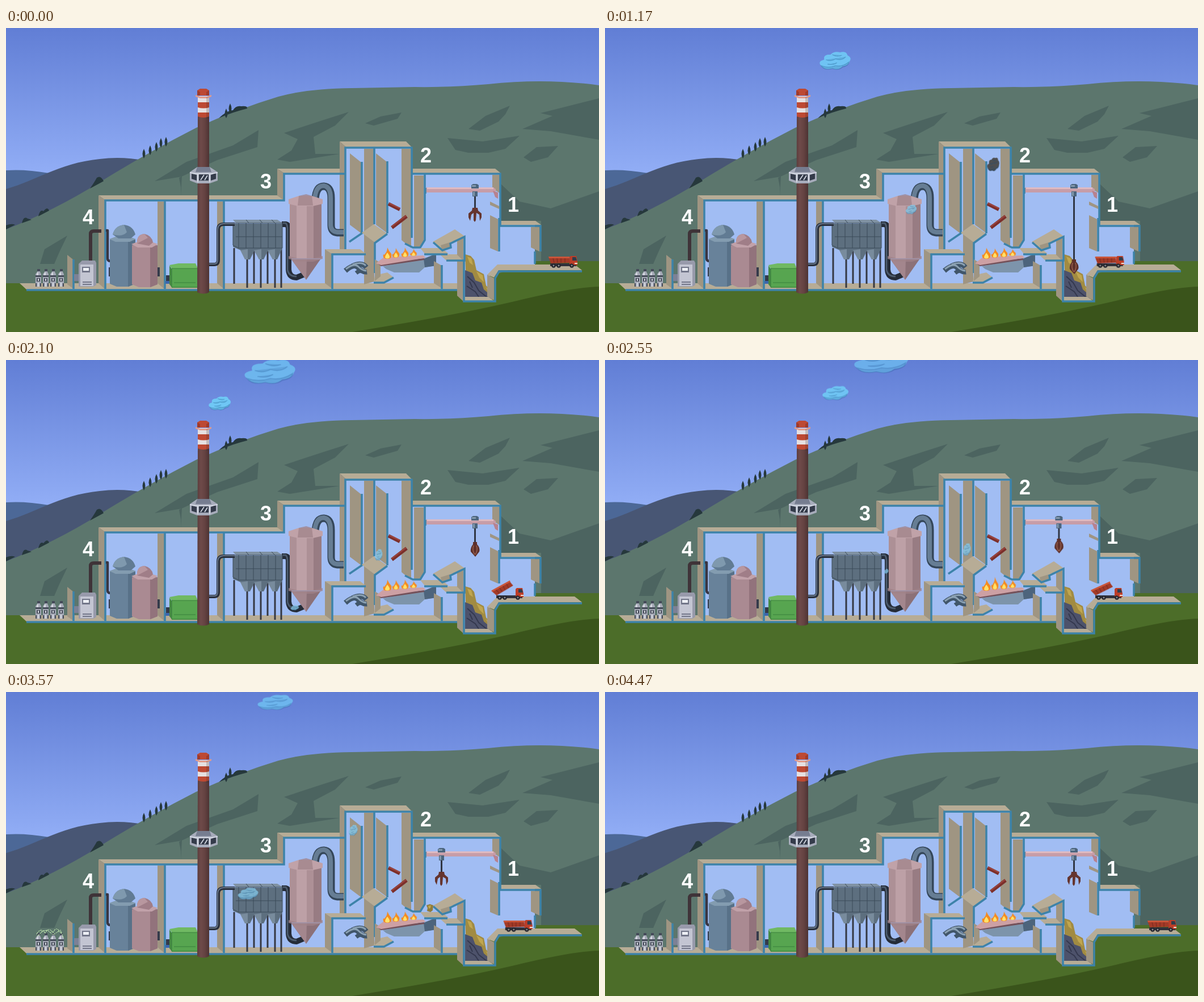
Write an HTML page without scripts that moves like this. It is 1045 by 536 pixels and loops after 4.53 s.

```html
<!DOCTYPE html>
<html lang="en">
<head>
<meta charset="utf-8">
<title>Waste-to-energy plant</title>
<style>
html,body{margin:0;width:100%;height:100%;overflow:hidden;background:#4b6c28}
svg{display:block;width:1045px;height:536px}
text{font:bold 36px "Liberation Sans",Arial,sans-serif;fill:#fff}
.top{fill:#b7ac96}.side{fill:#9f9582}.room{fill:#a1bdf3}
.edge{fill:none;stroke:#3d83a9;stroke-width:3.5}
.patch{fill:#4c6460}.tree{fill:#26383c}
.pipe{fill:none;stroke-linejoin:round}
.seam{fill:none;stroke:#3b4b59;stroke-width:1}
.puff{color:#70c7f5}
.anim{animation:4530ms linear infinite}
.plumeA{animation-name:plumeA}.plumeB{animation-name:plumeB}
.smoke{animation-name:smoke}
.duct{animation-name:duct;color:#83c3e4}
.truck{animation-name:truck}
.bed{animation-name:bed;transform-origin:960px 416px}
.trolley{animation-name:trolley}.hoist{animation-name:hoist}
.open{animation-name:open;animation-timing-function:step-end}
.shut{animation-name:shut;animation-timing-function:step-end}
.chunk{animation-name:chunk}
.spark{fill:none;stroke:#c9f0b4;stroke-width:1.1;stroke-dasharray:4 1.5 2 1;opacity:0;animation-timing-function:step-end}
.s1{animation-name:s1}.s2{animation-name:s2}.s3{animation-name:s3}
.flame{animation:flame 906ms linear infinite}
@keyframes plumeA{
0%,3.5%{transform:translate(350px,109px) scale(.1);opacity:0}
5.3%{transform:translate(355px,96px) scale(.45,.8);opacity:1}
15.9%{transform:translate(377px,77px);opacity:1}
35.76%{transform:translate(435px,40px) scale(1.8,1.6);opacity:.9}
46.36%{transform:translate(466px,22px) scale(2.3,1.75);opacity:.75}
65.56%{transform:translate(508px,-14px) scale(2.6,1.7);opacity:.6}
72%,100%{transform:translate(525px,-35px) scale(2.7,1.7);opacity:0}}
@keyframes plumeB{
0%,34%{transform:translate(350px,109px) scale(.1);opacity:0}
35.76%{transform:translate(355px,96px) scale(.45,.8);opacity:1}
46.36%{transform:translate(377px,77px);opacity:1}
65.56%{transform:translate(434px,42px) scale(1.35,1.05);opacity:.9}
78.8%{transform:translate(475px,19px) scale(1.6,1.1);opacity:.75}
95%,100%{transform:translate(525px,-20px) scale(1.9,1.2);opacity:.6}}
@keyframes smoke{
0%,4%{transform:translate(692px,388px) scale(.15);opacity:0;color:#4b4a4d}
7%{opacity:1}
15.9%{transform:translate(696px,302px) scale(.57,1.45);opacity:1}
28%{transform:translate(682px,228px) scale(.55,.9)}
35.76%{transform:translate(658px,233px) scale(.45,.75);opacity:1;color:#4e5053}
42%{color:#83bfdd}
46.36%{transform:translate(657px,344px) scale(.34,.85);opacity:.85;color:#83c3e4}
51%{transform:translate(646px,364px) scale(.34,.6)}
55%{transform:translate(638px,345px) scale(.36,.9)}
65.56%{transform:translate(635px,262px) scale(.4,1.05);opacity:.85}
72%{transform:translate(624px,224px) scale(.4,.8)}
78.8%{transform:translate(612px,244px) scale(.4,.8);opacity:.85}
91%{transform:translate(603px,345px) scale(.35,.8);opacity:.8;color:#83c3e4}
94%,100%{transform:translate(592px,358px) scale(.2);opacity:0;color:#83c3e4}}
@keyframes duct{
0%,4%{transform:translate(592px,359px) scale(.2);opacity:0}
6%{transform:translate(575px,355px) scale(.25,.4);opacity:.8}
11%{transform:translate(572px,300px) scale(.25,.5)}
15.9%{transform:translate(562px,281px) scale(.55,.42);opacity:.8}
22%{transform:translate(545px,296px) scale(.35,.5)}
35.76%{transform:translate(526px,383px) scale(.87,1.2);opacity:.8}
46.36%{transform:translate(509px,437px) scale(.38,.38);opacity:.8}
51%{transform:translate(497px,410px) scale(.18,.5)}
60%{transform:translate(495px,347px) scale(.2,.25)}
65.56%{transform:translate(476px,345px) scale(.52,.24);opacity:.8}
78.8%{transform:translate(427px,356px) scale(.92,.85);opacity:.8}
91%{transform:translate(400px,346px) scale(.25,.2);opacity:.8}
95%,100%{transform:translate(376px,350px) scale(.12);opacity:0}}
@keyframes truck{
0%,9.4%{transform:none;animation-timing-function:ease}
30.3%,75.9%{transform:translateX(-95px);animation-timing-function:ease}
96.8%,100%{transform:none}}
@keyframes bed{0%,37%{transform:none}46%,55%{transform:rotate(-29deg)}64%,100%{transform:none}}
@keyframes trolley{0%,50%{transform:none}64%,83%{transform:translateX(-59px)}97%,100%{transform:none}}
@keyframes hoist{0%,2%{transform:none}15.5%,29%{transform:translateY(93px)}
35.76%{transform:translateY(60px)}46.36%{transform:translateY(6px)}48%,100%{transform:none}}
@keyframes open{0%{opacity:1}23%{opacity:0}70.5%,100%{opacity:1}}
@keyframes shut{0%{opacity:0}23%{opacity:1}70.5%,100%{opacity:0}}
@keyframes chunk{0%,70%{transform:translate(767px,333px);opacity:0}71%{opacity:1}
75%{transform:translate(767px,370px)}78.8%{transform:translate(747px,381px);opacity:1}
88%{transform:translate(715px,396px);opacity:1}91%,100%{transform:translate(705px,402px);opacity:0}}
@keyframes s1{0%{opacity:0}30%{opacity:1}38%,100%{opacity:0}}
@keyframes s2{0%{opacity:0}62%{opacity:1}70%,100%{opacity:0}}
@keyframes s3{0%{opacity:0}70%{opacity:1}83%,100%{opacity:0}}
@keyframes flame{0%,36%,92%,100%{transform:none}18%{transform:scaleY(.92)}79%{transform:scaleY(var(--peak))}}
</style>
</head>
<body>
<svg viewBox="0 0 1045 536">
<defs>
<linearGradient id="sky" x2="0" y2="1"><stop stop-color="#617ed5"/><stop offset=".68" stop-color="#92aef6"/></linearGradient>
<linearGradient id="brick"><stop stop-color="#5b3c3c"/><stop offset=".3" stop-color="#6e4a49"/><stop offset=".65" stop-color="#644241"/><stop offset="1" stop-color="#4d3333"/></linearGradient>
<clipPath id="below"><path d="M700 296H900V500H700Z"/></clipPath>
<g id="cloud">
<path fill="currentColor" d="M-19 5Q-22 0-14-2Q-16-9-6-9Q-2-14 6-12Q14-14 15-8Q21-5 18 0Q17 6 9 7Q4 13-4 10Q-14 13-19 5Z"/>
<path d="M-18 6Q-9 10 0 6Q9 8 17 1Q17 6 9 8Q4 13-4 10Q-14 13-18 6ZM-12-2Q-6 1 0-3Q8 0 13-6M-4-9Q2-5 8-8M-10 4Q-3 6 2 2" fill="#134a7a" fill-opacity=".18" stroke="#1b5b8d" stroke-opacity=".3" stroke-width="1"/>
</g>
<g id="fire">
<path fill="#f58a1f" d="M0-20Q3-13 7-9Q9 0 0 0Q-9 0-7-8Q-5-6-4-9Q0-13 0-20Z"/>
<path fill="#ffe26a" d="M0-11Q5-5 4-2Q0 1-4-2Q-4-6 0-11Z"/>
</g>
<g id="bottle">
<path fill="#a5a9b6" d="M3 0H8V5L10 9V31H0V9L3 5Z"/>
<path fill="#444a58" d="M3 0H8V4H3ZM0 11H10V14H0ZM2 16H8V22H2ZM0 25H2V31H0ZM8 25H10V31H8Z"/>
<path fill="#d5d8e0" d="M3 6H5V11H2V9ZM4 17H6V21H4ZM4 24H6V31H4Z"/>
</g>
<path id="cypress" class="tree" d="M0 0Q-5-7 0-17Q5-7 0 0Z"/>
</defs>

<path fill="url(#sky)" d="M0 0H1045V380H0Z"/>
<path fill="#4c6897" d="M0 251Q45 248 100 261V350H0Z"/>
<path fill="#485674" d="M0 284C55 268 95 238 165 231Q205 226 245 234V380H0Z"/>
<path fill="#5c766d" d="M0 355Q85 322 165 272T335 176Q410 142 480 121Q530 107 610 106L720 104Q780 105 850 99Q950 88 1045 101V460H0Z"/>
<g class="patch">
<path d="M262 270L318 236L400 207L445 180L443 210L372 233L305 264L308 280V296L310 262Z"/>
<path d="M604 148L560 162L490 185L514 196L503 216L478 232L500 236L588 222L545 222L542 192L580 172Z"/>
<path d="M633 168L660 156L697 149L690 160L648 172ZM815 178L845 155L888 137L880 152L868 165L835 181Z"/>
<path d="M910 178L963 155L942 150L1045 124V197L960 182ZM912 228L935 210L973 208L955 228L925 236Z"/>
<path d="M778 194L840 200L905 190L880 213L850 220H815L792 215Z"/>
<path d="M872 275L905 306L960 318L1045 288V411H943V340H872ZM68 390L108 366L95 393L85 416H60Z"/>
</g>
<g class="tree">
<path d="M375 159Q390 145 400 145Q405 136 415 138Q426 137 425 142Q400 148 375 159ZM148 283Q157 270 160 264Q167 259 172 270ZM28 344Q31 331 38 336L45 338ZM57 332Q60 319 66 323Q73 314 76 322Z"/>
<path d="M0 355V348Q10 344 16 347Z"/>
</g>
<use href="#cypress" x="254" y="224"/><use href="#cypress" x="265" y="218"/><use href="#cypress" x="273" y="211"/><use href="#cypress" x="282" y="209"/>
<use href="#cypress" x="388" y="159"/><use href="#cypress" x="395" y="150"/><use href="#cypress" x="243" y="230"/>
<path fill="#4c6d29" d="M0 450H800L870 432L935 411H1045V536H0Z"/>
<path fill="#3a541b" d="M610 536Q800 505 900 481T1045 456V536Z"/>

<g class="puff">
<use href="#cloud" class="anim plumeA"/><use href="#cloud" class="anim plumeB"/>
</g>

<!-- building shell -->
<path class="room" d="M174 304H490V256H598V210H715V256H872V347H932V418H866L850 440V480H808V455H174Z"/>
<path class="top" d="M163 295H478L490 303H174ZM478 248H588L599 256H490ZM588 200H705L715 210H599ZM715 248H862L872 256H715ZM872 340H933L943 347H872ZM24 450H795L806 461H36Z"/>
<path class="side" d="M163 295L174 303V460L163 450ZM478 248L490 256V304L478 295ZM267 306H279V460L267 450ZM372 306H384V460L372 450ZM108 400L118 408V459L108 452Z"/>
<path class="side" d="M588 200L599 210V398L588 390ZM857 259H870V291L857 283ZM853 306L869 314V319L853 312ZM853 330L867 337V394L853 388ZM925 351H940V394L925 387Z"/>
<path class="edge" d="M36 462H806M175 460V304H490V257H598V211H715V257H871V349H942V394M280 305V460M384 305V460M119 408V460M598 257V400M869 335V394M932 394V416"/>

<!-- trailing pit, pile and ramp -->
<path class="side" d="M795 400L806 408V482L795 472Z"/>
<path fill="#a18b42" d="M809 399L819 402L825 409L829 427L842 434L846 454L855 464L858 478H812Z"/>
<path fill="#c0a64f" d="M813 403L820 406L823 418L817 414ZM829 429L840 436L842 448L834 440ZM845 456L853 464L854 473Z"/>
<path fill="#4d526b" d="M809 427L822 432L827 445L838 449L842 461L855 472V479H809Z"/>
<path fill="none" stroke="#34384e" stroke-width="2" d="M813 438L825 449L833 463L848 475M812 455L827 465L835 477M817 447L822 458"/>
<path class="top" d="M866 417H1002L1015 427H868L860 440L848 435Z"/>
<path class="side" d="M848 435L860 441V480L848 473Z"/>
<path class="top" d="M808 474H850L860 481H808Z"/>
<path class="edge" d="M807 408V482H862V441L869 429H1015"/>

<!-- boiler passes -->
<path class="side" d="M606 221L626 237V362L606 347ZM631 213H649V347L631 360ZM652 221L671 236V361L652 347ZM697 213H714V388L697 374ZM719 260H736V375L729 387H719Z"/>
<path class="edge" d="M627 236V362L605 377M649 212V346M672 235V362M715 212V370M738 258V374L730 387H717L703 380"/>
<path class="side" d="M631 363L649 377V447L631 452Z"/>
<path class="top" d="M627 361L648 346L671 362L650 378Z"/>
<path class="edge" d="M672 363L650 379V432"/>
<path class="room" d="M576 400H630V450H576Z"/>
<path class="top" d="M562 390H624L634 398H574Z"/>
<path class="side" d="M562 390L574 398V459L562 450Z"/>
<path class="edge" d="M575 460V399H634"/>
<path class="top" d="M650 436L672 431L682 439L665 449H648Z"/>
<path class="edge" d="M648 449H666L683 440"/>
<g class="pipe" stroke="#41566a" stroke-width="9"><path d="M598 428Q613 415 620 422Q628 431 636 430M610 420Q627 412 635 422"/><path d="M617 432Q625 425 632 431" stroke-width="7"/></g>
<path class="pipe" stroke="#8ba1b3" stroke-width="3" d="M599 425Q613 414 620 420Q628 428 635 428M611 417Q627 411 634 419"/>
<path class="pipe" stroke="#7c2f2b" stroke-width="6" d="M674 310L694 320M680 352L706 332"/>
<path class="pipe" stroke="#a64a42" stroke-width="1.5" d="M675 309L694 318M680 350L705 331"/>

<!-- furnace and feed hopper -->
<path fill="#7d94ab" d="M664 420L736 407L758 398V419L738 422L728 431H684L670 425Z"/>
<path fill="#4d647c" d="M736 407L758 398V419L738 422Z"/>
<path class="side" d="M650 408L660 414V438L650 446Z"/>
<path fill="#74515a" d="M654 415L737 406V409L661 420Z"/>
<path fill="#cda0a4" d="M652 415L666 404L735 401L740 405L661 418Z"/>
<path class="top" d="M730 388H768L780 398H738Z"/>
<path class="side" d="M754 411L768 419V459L754 450Z"/>
<path class="room" d="M769 412H795V450H769Z"/>
<path class="top" d="M752 377L791 355L808 367L783 379L784 386L768 391ZM764 399H795L806 410H776Z"/>
<path class="side" d="M795 375L806 369V410L795 400ZM766 383L782 378L784 386L768 391Z"/>
<path class="edge" d="M737 399H778M753 378L769 392L784 387L783 380L808 368V410H776M768 418V460" stroke-width="2.5"/>
<g transform="translate(672 407)"><use href="#fire" class="flame" style="--peak:1"/></g>
<g transform="translate(687 405)scale(.85)"><use href="#fire" class="flame" style="--peak:1.4"/></g>
<g transform="translate(703 404)scale(.85)"><use href="#fire" class="flame" style="--peak:1.02"/></g>
<g transform="translate(718 402)scale(.8 .62)"><use href="#fire" class="flame" style="--peak:1.15"/></g>

<!-- reactor and filter -->
<path class="pipe" stroke="#35475a" stroke-width="13" d="M545 303Q546 279 560 279Q573 280 573 300V348Q573 360 584 361H595"/>
<path class="pipe" stroke="#667d94" stroke-width="8" d="M544 303Q545 278 560 278Q572 280 572 300V348Q573 359 584 360H595"/>
<g class="pipe" stroke="#252c38" stroke-width="10"><path d="M486 346H493Q498 347 498 355V426Q499 440 512 440L524 435"/><path stroke="#4b5a6c" stroke-width="3" d="M488 344H493Q496 347 496 355V426Q498 438 512 438"/></g>
<path fill="#8c7178" d="M503 408H554L529 444Z"/>
<path fill="#a3868d" d="M503 408H530L529 444Z"/>
<path fill="#ad9096" d="M500 309H556V406H500Z"/>
<path fill="#bda0a6" d="M512 309H530V406H512Z"/>
<path fill="#987c83" d="M542 309H556V406H542Z"/>
<path fill="#c0a2a8" d="M498 302L516 296H539L558 302V310L541 314H514L498 310Z"/>
<path fill="#a1838a" d="M498 402L513 406H541L558 402V407L541 412H513L498 407ZM516 296L529 293L539 296L541 313H514Z" fill-opacity=".75"/>
<path class="pipe" stroke="#353842" stroke-width="3" d="M402 388V451M437 390V451M461 390V451M425 400V458M449 400V458M474 400V458M485 388V458"/>
<path fill="#5d6f7f" d="M400 345H487V388L478 408H470L462 392L454 408H446L438 392L430 408H422L414 392L400 386Z"/>
<path fill="#8092a3" d="M400 338H478L488 344H405Z"/>
<path fill="#788b9c" d="M413 392L421 408H426V390ZM437 392L446 408H450V390ZM461 392L470 408H474V390Z"/>
<path class="seam" d="M400 344H487V388H410L400 383ZM410 344V388M423 344V388M436 344V388M449 344V388M462 344V388M475 344V388M405 368H487M423 338L428 344M447 338L452 344M468 338L474 344"/>
<path class="pipe" stroke="#292f3b" stroke-width="6" d="M403 346H383Q374 346 374 355V409Q374 417 367 417H358"/>
<path class="pipe" stroke="#65758a" stroke-width="2" d="M403 345H383Q373 346 373 355V408Q373 416 367 416H358"/>

<!-- generator hall -->
<path fill="#343a4a" d="M265 422H271V438H265ZM181 422H185V438H181ZM282 436H292V449H282Z"/>
<path fill="#3d66ad" d="M281 446H292V451H281Z"/>
<path class="pipe" stroke="#393541" stroke-width="4.5" d="M176 357H179V406Q179 411 184 411H190"/>
<path fill="#68829a" d="M183 373H228V451L216 456H195L183 451Z"/>
<path fill="#587188" d="M215 373H228V451L215 456Z"/>
<path fill="#839cb0" d="M182 372L193 368H217L229 372L218 377H193Z"/>
<path fill="#617b93" d="M188 364Q192 349 208 347Q224 349 228 364L220 371H198Z"/>
<path fill="#7f99ae" d="M188 364Q192 349 208 347L213 360Q205 369 188 364Z"/>
<path fill="#aa8a92" d="M222 383H267V452L255 457H234L222 452Z"/>
<path fill="#92737c" d="M254 383H267V452L254 457Z"/>
<path fill="#c1a1a9" d="M221 381L232 377H256L268 381L257 387H232Z"/>
<path fill="#a07e88" d="M231 380Q230 364 244 363Q257 366 259 378L252 384Z"/>
<path fill="#b8979f" d="M231 380Q230 364 244 363L250 370Z"/>
<path fill="#458a45" d="M288 419L293 426V458L288 452Z"/>
<path fill="#70b963" d="M288 418L304 415H334L338 424H292Z"/>
<path fill="#57a550" d="M292 424H338V458H292Z"/>
<path fill="none" stroke="#397f3a" d="M292 424H338V457H292ZM296 449H334"/>

<!-- transformer and bottles -->
<path fill="#7c8196" d="M120 434H128V446H120Z"/>
<path class="pipe" stroke="#3f3338" stroke-width="6" d="M149 413V363Q149 358 155 358H168"/>
<path fill="#989aab" d="M128 416L134 410H157L159 414V453L154 456H128Z"/>
<path fill="#c3c5d2" d="M131 417H154V455H131Z"/>
<path fill="#727689" d="M134 421H148V431H134ZM135 447H151V449H135ZM135 451H151V453H135Z"/>
<path fill="#eceef4" d="M136 423H146V428H136Z"/>
<use href="#bottle" x="52" y="425"/><use href="#bottle" x="65" y="425"/><use href="#bottle" x="78" y="425"/><use href="#bottle" x="92" y="425"/>
<path class="anim spark s1" d="M50 452L43 444L48 436L44 430L54 424L59 418L72 416L76 428L68 433L61 430L55 440M78 427L86 421L92 425L104 428L100 437L105 442L98 450L88 447L83 440L72 446L63 441"/>
<path class="anim spark s2" d="M78 432L83 426L90 430L94 425L99 431L92 438L85 434L80 440L89 446"/>
<path class="anim spark s3" d="M54 427Q61 414 69 425Q76 413 83 425Q88 410 97 426M56 430L65 421L73 420L83 428L96 420L101 433"/>

<!-- chimney -->
<path fill="url(#brick)" d="M338 150H358V466Q348 471 337 466Z"/>
<path fill="#e6e0e1" d="M338 120H358V150H338Z"/>
<path fill="#bd4933" d="M338 131H358V140Q348 143 338 140ZM338 149H358V156Q348 160 338 156ZM337 110L342 107H353L358 110V119H337Z"/>
<path fill="#8f3428" d="M337 110L342 113H353L358 110V119H353V113H342V119H337Z" opacity=".65"/>
<path fill="#e29b8b" d="M334 118L342 121H354L362 118V121L354 124H342L334 121Z"/>
<path fill="#39282c" opacity=".2" d="M353 122H358V160H353Z"/>
<path fill="#a7acbb" d="M324 254L337 245H359L373 254V269L359 274H337L324 269Z"/>
<path fill="#767d90" d="M337 245H359L362 254H334Z"/>
<path fill="#343b4a" d="M327 257L336 259V269L327 266ZM340 258H357V269H340ZM361 259L370 256V266L361 269Z"/>
<path stroke="#dfe3ed" stroke-width="1.5" fill="none" d="M324 255L336 257H361L373 255M338 257V272M359 257V272M343 268L349 259M350 268L355 260"/>

<!-- crane -->
<path fill="#c79da8" d="M741 281H859L863 284V288L859 290H741L738 286Z"/>
<path fill="#dfbac2" d="M742 281H859V284H742Z"/>
<path fill="#b7828f" d="M858 287L867 290V301L862 298Z"/>
<path class="edge" d="M739 282V292"/>
<g class="anim trolley">
<g clip-path="url(#below)"><g class="anim hoist">
<path fill="#303644" d="M825 180H828V320H825Z"/>
<g class="anim open"><path fill="#65352f" d="M822 317H831L832 322L838 327V334L835 340L834 329L829 326L828 339L826 342L824 339V326L820 329L818 340L815 334V327L821 322Z"/></g>
<g class="anim shut"><path fill="#5d302b" d="M823 315H830V319Q836 325 834 332L827 341L819 332Q818 325 823 319Z"/><path d="M824 321Q821 329 826 337M829 321Q832 329 827 337" fill="none" stroke="#9b6350" stroke-width="1.5"/></g>
</g></g>
<path fill="#4c657d" d="M820 277L823 275H830L833 277V283H820ZM822 288H831V297H822Z"/>
<path fill="#8298ac" d="M821 277H828V280H821ZM823 289H826V296H823Z"/>
</g>
<g class="anim chunk"><path fill="#907b38" d="M-6-5L0-7L6-5L5 4L1 7L-5 5L-4 0Z"/><path fill="#c0a64f" d="M-3-4L2-5L1 0L-2 1Z"/></g>

<!-- truck -->
<g class="anim truck">
<path fill="#30313a" d="M959 415H1005V420H959Z"/>
<g fill="#25262d"><circle cx="965" cy="419" r="3.7"/><circle cx="974" cy="419" r="3.7"/><circle cx="997" cy="419" r="3.7"/></g>
<g fill="#8d8d94"><circle cx="965" cy="419" r="1.4"/><circle cx="974" cy="419" r="1.4"/><circle cx="997" cy="419" r="1.4"/></g>
<path fill="#bb3d28" d="M993 404L995 402H1005L1007 412V418H1001Q997 413 993 417Z"/>
<path fill="#303d4c" d="M998 404H1004L1006 410H998Z"/>
<path fill="#eee1d1" d="M1002 414H1007V416H1002Z"/>
<g class="anim bed"><path fill="#a33a27" d="M956 404H992L994 414L960 415Z"/><path fill="#c9553a" d="M956 403H993V406H957Z"/><path fill="none" stroke="#74281f" d="M964 406L966 414M971 406L972 414M978 406V414M985 406V414"/></g>
</g>

<g class="puff">
<use href="#cloud" class="anim smoke"/><use href="#cloud" class="anim duct"/>
</g>
<text x="884" y="323.5">1</text><text x="730" y="236.5">2</text><text x="448" y="283">3</text><text x="135" y="346">4</text>
</svg>
</body>
</html>
```
